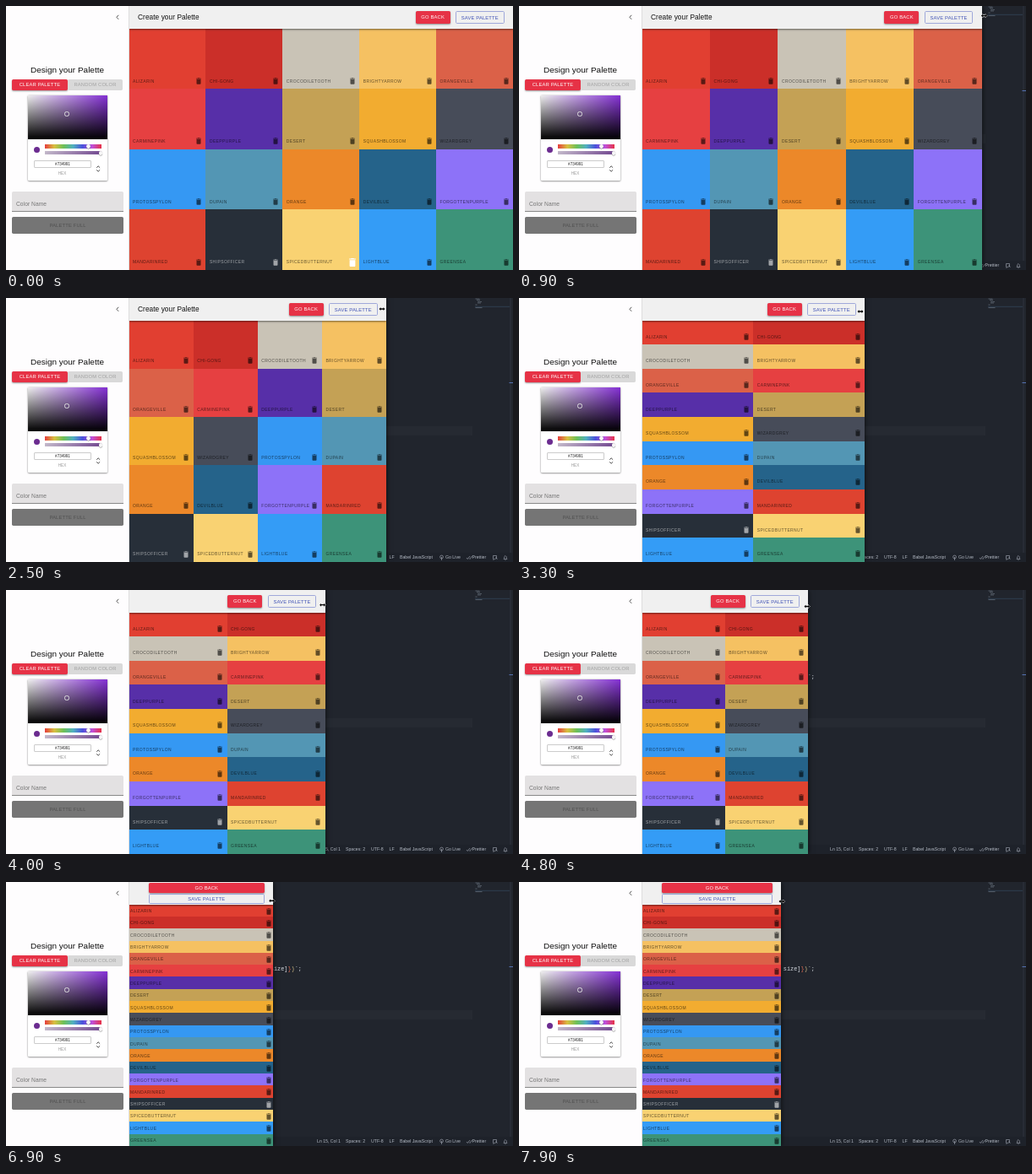
Recreate the animation shown at these times as an HTML page. Size 600x313 px, loop 8000 ms.

```html
<!DOCTYPE html>
<html lang="en">
<head>
<meta charset="utf-8">
<title>Responsive palette</title>
<style>
* { box-sizing: border-box; }
html, body { margin: 0; width: 100%; height: 100%; overflow: hidden; }
body { position: relative; background: #21252d; font: 5.82px/1 "Liberation Sans", Arial, sans-serif; }
div, b, span.at, svg { position: absolute; white-space: nowrap; }
b { font-weight: 400; }

/* editor behind the window */
#status { left: 0; right: 0; top: 302px; height: 11px; background: #1e222a; color: #b4bac4; font-size: 5.2px; line-height: 11px; }
#code { right: 250px; top: 99px; font: 6.9px/8px "Liberation Mono", monospace; color: #d5d9e0; }
#line { left: 0; top: 152px; width: 552px; height: 11px; background: #262a32; }

/* browser window */
#app { left: 0; top: 0; height: 313px; overflow: hidden; background: #fff; box-shadow: 0 0 6px #000b; }
#side { left: 0; top: 0; width: 145.5px; height: 313px; background: #fefdfe; border-right: .5px solid #ddd; }
#bar { left: 145.5px; right: 0; top: 0; height: 26.5px; background: #f0f0f0; box-shadow: 0 .8px 2px #0008; }
#title { left: 10.5px; top: 8.6px; font-size: 8.31px; letter-spacing: .0075em; color: #111; }
.btn { text-align: center; letter-spacing: .02857em; border-radius: 1.7px; height: 15px; line-height: 15px; }
.red { background: #e63246; color: #fff; box-shadow: 0 1px 2px #0006; }
#back { right: 74.4px; top: 6px; width: 41px; }
#save { right: 10.4px; top: 6px; width: 57.6px; border: .6px solid #9fa8da; color: #3f51b5; line-height: 14px; }

#grid { left: 145.5px; right: 0; top: 26.6px; height: 286.4px; display: flex; flex-wrap: wrap; align-content: flex-start; }
.cell { position: relative; width: 20%; height: 25%; color: #0009; }
.cell.pale { color: #ffffff90; }
.cell b { left: 4.5px; bottom: 6.6px; font-size: 4.99px; letter-spacing: .416px; }
.cell svg { right: 3.4px; bottom: 4.4px; width: 10px; height: 10px; fill: currentColor; }
.cell svg.hot { fill: #fff; transform: scale(1.35); }
.lg .cell { width: 25%; height: 20%; }
.md .cell { width: 50%; height: 10%; }
.md #title { display: none; }
.sm .cell { width: 100%; height: 5%; }
.sm .cell b { left: 1.5px; bottom: 3.8px; }
.sm .cell svg { right: 0; bottom: 1.2px; }
.sm #back, .sm #save { left: 23.7px; right: 10px; width: auto; height: 12.3px; line-height: 12px; }
.sm #back { top: .8px; }
.sm #save { top: 13.8px; line-height: 11px; }

/* colour picker */
#picker { left: 26px; top: 106px; width: 94px; height: 101px; background: #fff; border-radius: 1px; box-shadow: 0 .5px 2px #0009; }
#sat { left: 0; top: 0; width: 94px; height: 52px; background: linear-gradient(#0000, #000), linear-gradient(90deg, #eee, #8430d4); }
#ring { left: 43.4px; top: 19.4px; width: 5.2px; height: 5.2px; border: .8px solid #ddd; border-radius: 50%; }
#dot { left: 6.5px; top: 60.5px; width: 7px; height: 7px; border-radius: 50%; background: #6b2c90; }
.slide { left: 20px; width: 67px; height: 4.2px; }
.slide i { position: absolute; top: -.3px; width: 4.8px; height: 4.8px; border-radius: 50%; background: #f8f8f8; box-shadow: 0 .4px 1px #0008; }
#hue { top: 58.4px; background: linear-gradient(90deg, #e63c3c, #d8c040, #6cc058, #50b0c0, #4a50dc, #c050dc, #e63246); }
#alpha { top: 66px; background: linear-gradient(90deg, #73499140, #734991), #ddd; }
#hex { left: 7px; top: 77px; width: 68px; height: 9.4px; border: .5px solid #ccc; border-radius: 1px; text-align: center; font-size: 4.57px; line-height: 8.6px; color: #222; }
#field { left: 7px; top: 220px; width: 132px; height: 24px; background: #e3e1e2; border-bottom: .8px solid #888; border-radius: 1.7px 1.7px 0 0; }
#field b { left: 5px; top: 11.8px; font-size: 6.65px; letter-spacing: .009em; color: #757575; }
</style>
</head>
<body>
<div id="line"></div>
<div id="code">size]<span style="color:#d2634d">}</span><span style="color:#d8c08a">)</span>`;</div>
<svg width="600" height="313" fill="none" stroke="#8a93a3" stroke-width=".6">
  <path d="M555.500 1h5M557 2.500h4M558 4.500h5M558 6h4M555.500 8h2M555.500 11.500h8" opacity=".8"/>
  <path d="M555 10.300h41" stroke="#3a5068"/>
  <path d="M597 0v302" stroke="#4a505b" opacity=".6"/>
  <path d="M595.500 100.500h4.500" stroke="#5470b0" stroke-width="1"/>
</svg>
<div id="status">
  <svg style="left:0;top:0" width="600" height="11" fill="none" stroke="#a9afba" stroke-width=".6">
    <circle cx="515.500" cy="5" r="1.900"/><path d="M515.500 5v4M545 6l1.300 1.500 2.700-3.500M548 6.500l1 1 2.500-3.500M576.500 3.500h4v3.500h-2l-1.500 1.500v-1.500h-.5zM579.500 5.500l2 2M589 7.500h4l-.7-1.200v-1.500q-1.300-2.600-2.600 0v1.500zM590.500 8.700h1"/>
  </svg>
</div>

<div id="app">
  <div id="grid"></div>
  <div id="bar">
    <div id="title">Create your Palette</div>
    <div id="back" class="btn red">GO BACK</div>
    <div id="save" class="btn">SAVE PALETTE</div>
  </div>
  <div id="side">
    <svg width="145" height="30" fill="none" stroke="#444" stroke-width=".9"><path d="M133.200 10.800l-2.300 2.500 2.300 2.500"/></svg>
    <div style="left:0;width:145px;top:71.300px;text-align:center;font-size:9.98px;color:#111">Design your Palette</div>
    <div class="btn red" style="left:7px;top:87px;width:66px;height:12.800px;line-height:12.800px">CLEAR PALETTE</div>
    <div class="btn" style="left:73px;top:87px;width:65px;height:12.800px;line-height:12.800px;background:#d9d9d9;color:#a2a2a2">RANDOM COLOR</div>
    <div id="picker">
      <div id="sat"></div><div id="ring"></div><div id="dot"></div>
      <div id="hue" class="slide"><i style="left:48.800px"></i></div>
      <div id="alpha" class="slide"><i style="left:63.500px"></i></div>
      <div id="hex">#734991</div>
      <div style="left:7px;width:67px;top:91.200px;text-align:center;font-size:4.57px;color:#969696">HEX</div>
      <svg style="left:0;top:0" width="94" height="101" fill="none" stroke="#333" stroke-width=".9"><path d="M81.300 85.700l1.900-1.900 1.900 1.900M81.300 88.300l1.900 1.900 1.900-1.900"/></svg>
    </div>
    <div id="field"><b>Color Name</b></div>
    <div class="btn" style="left:7px;top:250px;width:132px;height:20.400px;line-height:20.400px;background:#757575;color:#505050">PALETTE FULL</div>
  </div>
</div>
<svg id="cursor" style="left:0;top:0" width="10" height="8" viewBox="-5 -4 10 8"><path d="M-3.500 0l2-2v1.300h3v-1.300l2 2-2 2v-1.300h-3v1.300z" stroke="#fff" stroke-width=".8" paint-order="stroke"/></svg>

<script>
const $ = id => document.getElementById(id);
const colors = `ALIZARIN e13f31,CHI-GONG cb2f29,CROCODILETOOTH c9c3b6,BRIGHTYARROW f5c162,ORANGEVILLE db6148,
CARMINEPINK e64041,DEEPPURPLE 572fa8,DESERT c4a155,SQUASHBLOSSOM f2ac30,WIZARDGREY 474c59,
PROTOSSPYLON 3598f3,DUPAIN 5396b4,ORANGE ec8829,DEVILBLUE 25638a,FORGOTTENPURPLE 8d72f8,
MANDARINRED de4330,SHIPSOFFICER 272f39,SPICEDBUTTERNUT f9d272,LIGHTBLUE 349cf6,GREENSEA 3d9379`;
const trash = '<svg viewBox="0 0 24 24"><path d="M6 19c0 1.100.9 2 2 2h8c1.100 0 2-.9 2-2V7H6zM19 4h-3.500l-1-1h-5l-1 1H5v2h14z"/></svg>';
$('grid').innerHTML = colors.split(',').map(c => {
  const [name, hex] = c.trim().split(' ');
  return `<div class="cell${name === 'SHIPSOFFICER' ? ' pale' : ''}" style="background:#${hex}"><b>${name}</b>${trash}</div>`;
}).join('');
const hovered = $('grid').children[17].querySelector('svg');

const status = [[368, 'Ln 15, Col 1'], [402, 'Spaces: 2'], [432, 'UTF-8'], [453.5, 'LF'],
  [466, 'Babel JavaScript'], [520, 'Go Live'], [551.5, 'Prettier']];
for (const [x, text] of status) {
  $('status').insertAdjacentHTML('beforeend', `<span class="at" style="left:${x}px">${text}</span>`);
}

// time, window width, cursor x, cursor y
const keys = [[0, 600, 605, 11], [1500, 513, 514, 12], [2500, 450, 445, 13], [3300, 409, 404, 16],
  [4800, 342, 341, 19.5], [6000, 320.5, 318, 21.5], [7900, 310, 311, 23], [8000, 310, 311, 23]];

function pose(t) {
  const i = keys.findIndex(k => k[0] > t);
  const a = keys[i - 1], b = keys[i], p = (t - a[0]) / (b[0] - a[0]);
  return a.map((v, j) => v + (b[j] - v) * p);
}

function draw(now) {
  const t = Math.floor(now % 8000 / 100) * 100;
  const [, w, x, y] = pose(t);
  const app = $('app');
  app.style.width = w + 'px';
  app.classList.toggle('lg', w < 499);
  app.classList.toggle('md', w < 412.5);
  app.classList.toggle('sm', w < 319.3);
  hovered.classList.toggle('hot', t < 300);
  $('cursor').style.transform = `translate(${x - 5}px, ${y - 4}px)`;
  requestAnimationFrame(draw);
}
draw(performance.now());
</script>
</body>
</html>
```
